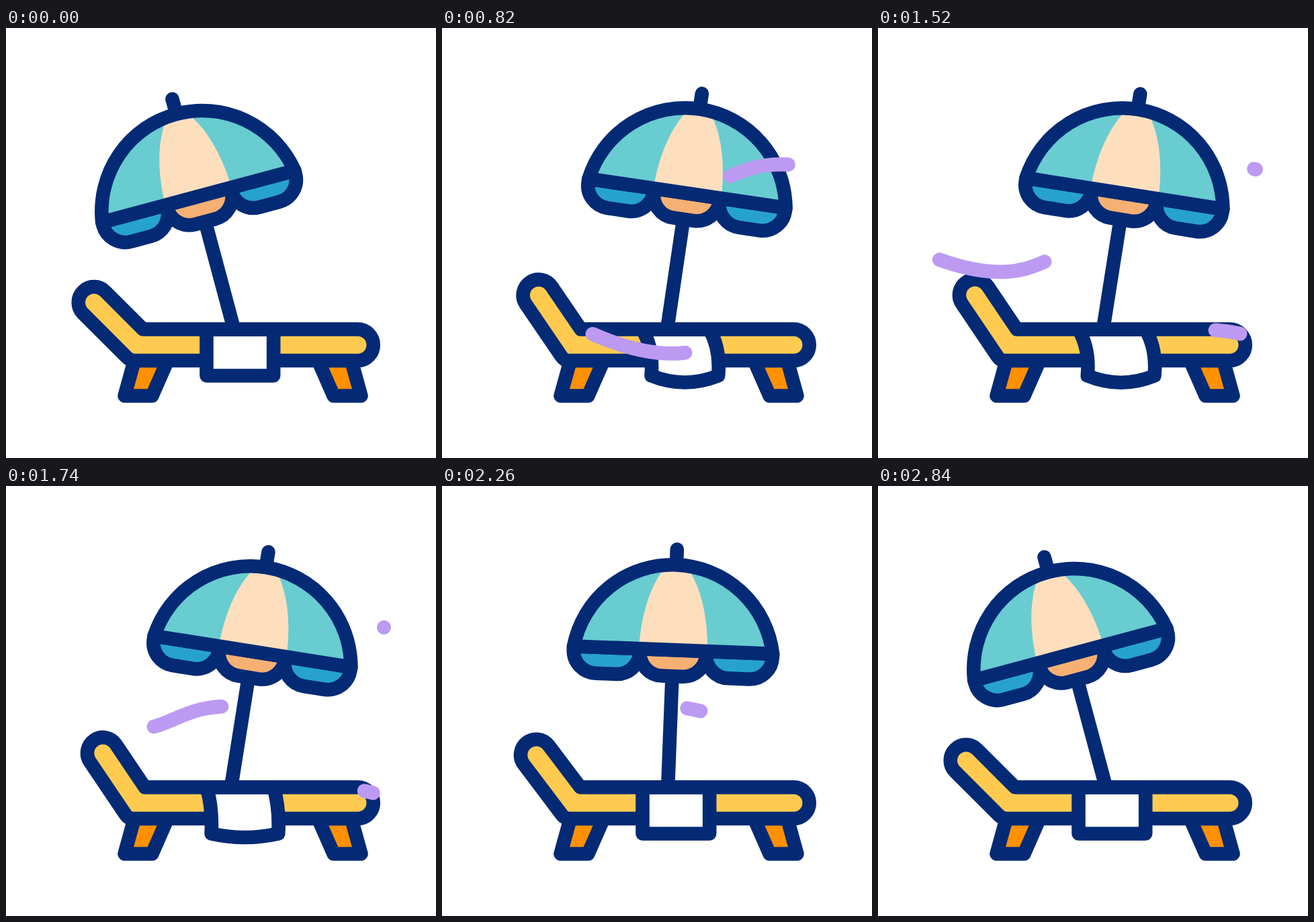
Recreate the animation shown at these times as an HTML page. Size 640 px wide and 640 px high, loop 3.02 s.

```html
<!DOCTYPE html>
<html lang="en">
<head>
<meta charset="utf-8">
<title>Beach lounger</title>
<style>
  html, body { margin: 0; width: 100%; height: 100%; overflow: hidden; background: #fff; }
  svg { display: block; width: 100%; height: 100%; }
  .ink { stroke: #042a75; stroke-width: 20.6; stroke-linecap: round; stroke-linejoin: round; }
  .wind { fill: none; stroke: #bc9af2; stroke-width: 21; stroke-linecap: round; }
</style>
</head>
<body>
<svg viewBox="0 0 640 640">
  <defs>
    <path id="lobe" d="M0 244v5a34 34 0 0 0 34 34h30.8a34 34 0 0 0 34 -34v-5z"/>
    <path id="gust" pathLength="1" d="M64 334C110 354 150 363 183 363C245 363 260 328 330 328C350 328 370 331 387 335.5"/>
  </defs>

  <g id="umbrella">
    <g transform="translate(336.6 0)">
      <path class="ink" d="M0 94V119M0 283V445"/>
      <g class="ink">
        <use href="#lobe" x="-148.2" fill="#27a2cf"/>
        <use href="#lobe" x="49.4" fill="#27a2cf"/>
        <use href="#lobe" x="-49.4" fill="#f7b073"/>
      </g>
      <path d="M-148.2 244A150 150 0 0 1 148.2 244z" fill="#68ccd1"/>
      <path d="M-51 244C-50 190 -36 145 -15 119H15C36 145 50 190 51 244z" fill="#fddfbe"/>
      <path class="ink" d="M-148.2 244A150 150 0 0 1 148.2 244z" fill="none"/>
    </g>
  </g>

  <g class="ink" fill="#ff9000">
    <path d="M191 495L176.5 547.5H217.4L240.5 495z"/>
    <path d="M514 495L528.5 547.5H487.6L464.5 495z"/>
  </g>
  <path id="seat" class="ink" fill="#fecb50"/>
  <path id="towel" class="ink" fill="#fff"/>

  <g id="winds">
    <use class="wind" href="#gust" x="175.5" y="-125"/>
    <use class="wind" href="#gust" x="160" y="121.5"/>
    <use class="wind" href="#gust"/>
  </g>
</svg>
<script>
const LOOP = 3020, STEP = 20;
const $ = id => document.getElementById(id);
const umbrella = $('umbrella'), seat = $('seat'), towel = $('towel');
const winds = [...$('winds').children];
const windDelay = [0, 400, 1000];

// [time, value] pairs, eased in and out between neighbours
const leanKeys = [[200, 0], [600, 1], [720, 1], [1130, 0.83], [1540, 1], [1950, 1], [2833, 0]];
const flapKeys = [[200, 0], [560, 1], [720, 1], [1130, 0.83], [1540, 1], [1960, 0]];

const clamp = x => Math.min(1, Math.max(0, x));
const smooth = x => x * x * (3 - 2 * x);
const easeOut = x => 1 - (1 - x) ** 3;

function track(keys, t) {
  let value = keys[0][1];
  for (let i = 1; i < keys.length; i++) {
    const [t0, v0] = keys[i - 1], [t1, v1] = keys[i];
    if (t >= t0) value = v0 + (v1 - v0) * smooth(clamp((t - t0) / (t1 - t0)));
  }
  return value;
}

function seatPath(deg) {
  const bx = 194.3, by = 471.7, r = 23.3, len = 89.5;
  const a = deg * Math.PI / 180, c = Math.cos(a), s = Math.sin(a);
  const shift = r * Math.tan(a / 2);
  const hx = bx - len * c, hy = by - len * s;
  const lowX = bx - shift, lowY = by + r, cut = 7;
  return `M${bx + shift} ${by - r}H523.5a${r} ${r} 0 0 1 0 ${2 * r}` +
    `H${lowX + cut}Q${lowX} ${lowY} ${lowX - cut * c} ${lowY - cut * s}` +
    `L${hx - r * s} ${hy + r * c}A${r} ${r} 0 0 1 ${hx + r * s} ${hy - r * c}z`;
}

function towelPath(k) {
  const l = 298.5, r = 398.2, top = 448.6, bottom = 517.5;
  const dx = 13.3 * k, bow = 17 * k;
  return `M${l} ${top}H${r}Q${r + bow} 478 ${r + dx} ${bottom}` +
    `Q${(l + r) / 2 + dx} ${bottom + 20.5 * k} ${l + dx} ${bottom}` +
    `Q${l + bow} 478 ${l} ${top}z`;
}

function drawWind(el, t) {
  const head = easeOut(clamp((t - 200) / 1300));
  const tail = easeOut(clamp((t - 480) / 1320));
  const on = head > tail;
  el.style.display = on ? '' : 'none';
  if (!on) return;
  el.style.strokeDasharray = `${Math.max(head - tail, 0.0005)} 3`;
  el.style.strokeDashoffset = -tail;
}

function draw(t) {
  const lean = track(leanKeys, t);
  umbrella.setAttribute('transform', `rotate(${-15 + 24 * lean} 336.6 438.2)`);
  seat.setAttribute('d', seatPath(45 + 11 * lean));
  towel.setAttribute('d', towelPath(track(flapKeys, t)));
  winds.forEach((el, i) => drawWind(el, t - windDelay[i]));
}

const start = performance.now();
function tick() {
  const t = (performance.now() - start) % LOOP;
  draw(Math.floor(t / STEP) * STEP);
  requestAnimationFrame(tick);
}
draw(0);
requestAnimationFrame(tick);
</script>
</body>
</html>
```
